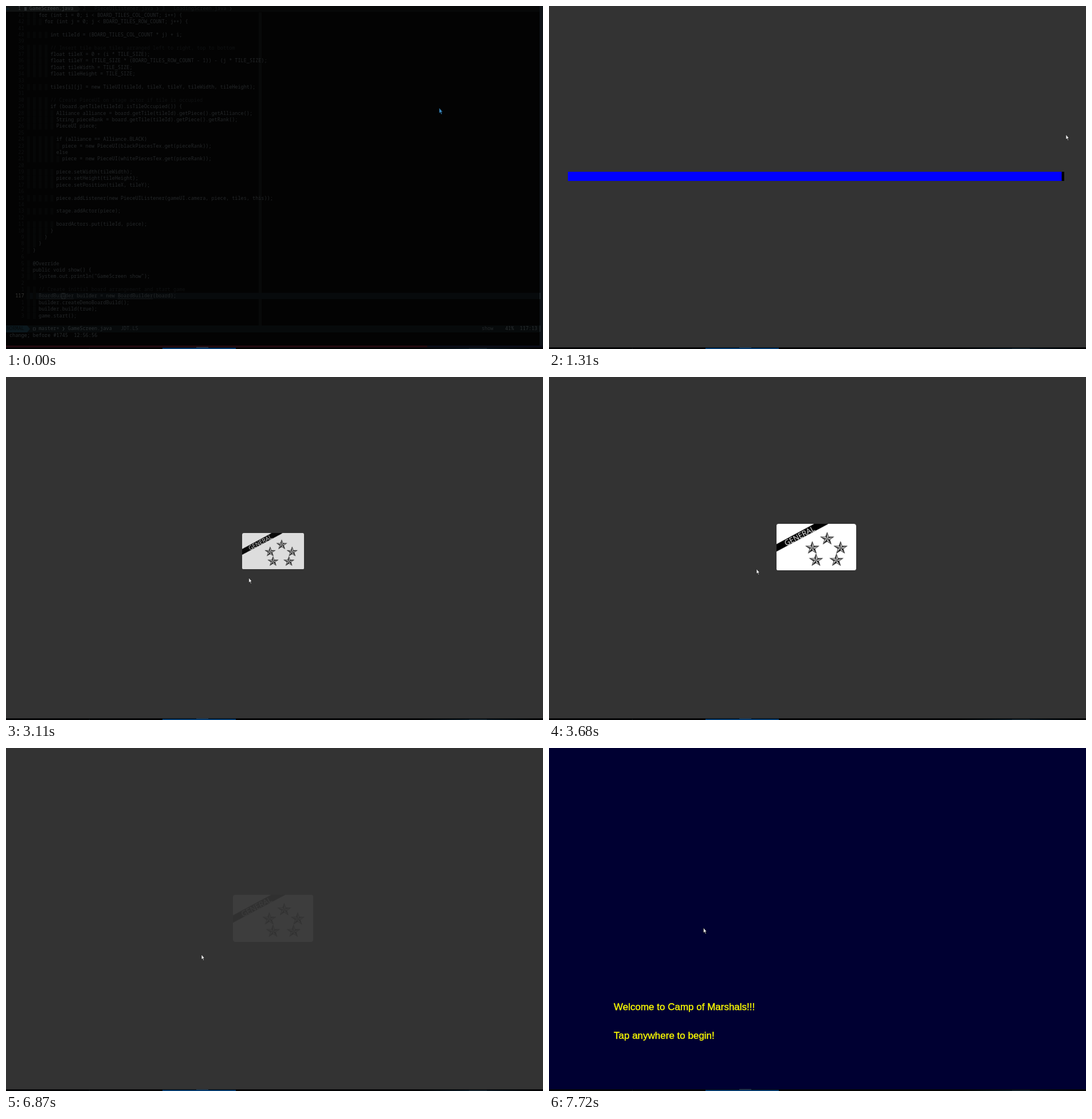
An HTML page with a canvas that plays this animation: 937x598 px, repeating every 8 s.

```html
<!DOCTYPE html>
<html lang="en">
<head>
<meta charset="utf-8">
<title>Splash</title>
<style>
html, body { margin: 0; width: 937px; height: 598px; overflow: hidden; background: #000; }
canvas { display: block; }
</style>
</head>
<body>
<canvas id="stage" width="937" height="598"></canvas>
<script>
const W = 937, H = 598, LOOP = 8000;
const ctx = document.getElementById('stage').getContext('2d');
ctx.imageSmoothingQuality = 'high';
const MONO = '"Noto Sans Mono", "DejaVu Sans Mono", monospace';

const code = `    for (int i = 0; i < BOARD_TILES_COL_COUNT; i++) {
      for (int j = 0; j < BOARD_TILES_ROW_COUNT; j++) {

        int tileId = (BOARD_TILES_COL_COUNT * j) + i;

        // Insert tile base tiles arranged left to right, top to bottom
        float tileX = 0 + (i * TILE_SIZE);
        float tileY = (TILE_SIZE * (BOARD_TILES_ROW_COUNT - 1)) - (j * TILE_SIZE);
        float tileWidth = TILE_SIZE;
        float tileHeight = TILE_SIZE;

        tiles[i][j] = new TileUI(tileId, tileX, tileY, tileWidth, tileHeight);

        // Create PieceUI on stage actor if tile is occupied
        if (board.getTile(tileId).isTileOccupied()) {
          Alliance alliance = board.getTile(tileId).getPiece().getAlliance();
          String pieceRank = board.getTile(tileId).getPiece().getRank();
          PieceUI piece;

          if (alliance == Alliance.BLACK)
            piece = new PieceUI(blackPiecesTex.get(pieceRank));
          else
            piece = new PieceUI(whitePiecesTex.get(pieceRank));

          piece.setWidth(tileWidth);
          piece.setHeight(tileHeight);
          piece.setPosition(tileX, tileY);

          piece.addListener(new PieceUIListener(gameUI.camera, piece, tiles, this));

          stage.addActor(piece);

          boardActors.put(tileId, piece);
        }
      }
    }
  }

  @Override
  public void show() {
    System.out.println("GameScreen show");

    // Create initial board arrangement and start game
    BoardBuilder builder = new BoardBuilder(board);
    builder.createDemoBoardBuild();
    builder.build(true);
    game.start();`.split('\n');

function rect(color, x, y, w, h, c = ctx) {
  c.fillStyle = color;
  c.fillRect(x, y, w, h);
}

function poly(color, pts, c = ctx) {
  c.beginPath();
  pts.forEach(p => c.lineTo(p[0], p[1]));
  c.closePath();
  c.fillStyle = color;
  c.fill();
}

function label(str, x, y, color) {
  ctx.fillStyle = color;
  ctx.fillText(str, x, y);
}

function drawEditor() {
  const left = 36.6, cw = 5.12, top = 16.3, lh = 11.39, current = 43;
  rect('#030303', 0, 0, W, H);
  rect('#080909', 441, 11, 5, 546);
  rect('#070a0c', 36, 500, 895, 11);

  // tab line
  rect('#070808', 0, 0, W, 10);
  poly('#101212', [[0, 0], [125, 0], [130, 5], [125, 10], [0, 10]]);
  rect('#0b1a20', 0, 3, 6, 4);
  ctx.font = '8.53px ' + MONO;
  ctx.textBaseline = 'middle';
  ctx.textAlign = 'left';
  label('1', 21, 5, '#3a3d3f');
  rect('#2c3032', 32, 2, 4, 6);
  label('GameScreen.java', 41, 5, '#3f4244');
  label('2   PieceUIListener.java ❯ 3   LoadingScreen.java ❯', 134, 5, '#171a1c');

  code.forEach((line, i) => {
    const y = top + i * lh, indent = line.search(/\S/);
    for (let k = 0; k < indent; k += 2) rect('#060707', left + k * cw, y - 5.7, cw, lh);
    const dim = line.trim().startsWith('//');
    label(line, left, y, dim ? '#101213' : '#25282a');
    ctx.textAlign = 'right';
    label(i === current ? '117' : Math.abs(current - i), 31.5, y, i === current ? '#3c3c39' : '#101213');
    ctx.textAlign = 'left';
  });
  rect('#1e2123', 57, 510, 61, .7);
  rect('#1e2123', 195, 510, 61, .7);
  ctx.strokeStyle = '#2a2e30';
  ctx.lineWidth = .8;
  ctx.strokeRect(97.5, 501, 5.5, 9.5);

  // status line
  rect('#070a0b', 0, 557, W, 12);
  poly('#0b181e', [[0, 557], [37, 557], [42, 563], [37, 569], [0, 569]]);
  label('NORMAL', 1, 563, '#06090a');
  ctx.strokeStyle = '#2b3032';
  ctx.strokeRect(47.5, 561, 4, 4);
  label('master+ ❯ GameScreen.java', 57, 563, '#2c3133');
  label('JDT.LS', 200, 563, '#24282a');
  label('show', 830, 563, '#24282a');
  label('41%  117:13', 871, 563, '#2c3133');
  label('change; before #1745  12:56:56', 6, 574.5, '#282c2e');

  rect('#0e1317', 931, 0, 6, 592);
  rect('#242c30', 931, 500, 1.5, 11);
  rect('#242c30', 931, 557, 1.5, 11);
  rect('#230a0f', 0, 592, 735, 3);
  rect('#0b0d18', 735, 592, 202, 3);
}

function drawTaskbar() {
  rect('#040506', 0, 595, W, 3);
  rect('#0d1418', 145, 596, 1, 2);
  rect('#063c70', 273, 596, 128, 2);
  rect('#26333c', 332, 594.5, 21, 1.5);
  const g = ctx.createLinearGradient(720, 0, 920, 0);
  g.addColorStop(0, '#040506');
  g.addColorStop(.5, '#0b1c28');
  g.addColorStop(1, '#040506');
  rect(g, 720, 596, 200, 2);
  rect('#16242e', 808, 596, 31, 2);
}

// faceted five-point star
function star(c, x, y) {
  const pt = i => {
    const a = -Math.PI / 2 + i * Math.PI / 5, r = i % 2 ? 4.6 : 11.6;
    return [x + r * Math.cos(a), y + .93 * r * Math.sin(a)];
  };
  const ring = Array.from({ length: 10 }, (_, i) => pt(i));
  poly('#d8d8d8', ring, c);
  for (let i = 0; i < 10; i += 2) poly(i === 4 || i === 6 ? '#111' : '#333', [[x, y], ring[i], ring[(i + 9) % 10]], c);
  c.beginPath();
  ring.forEach(p => c.lineTo(p[0], p[1]));
  c.closePath();
  c.strokeStyle = '#1c1c1c';
  c.lineWidth = .9;
  c.stroke();
}

const CARD = { x: 466.2, y: 296.8, w: 139.6, h: 81.4 };
const card = makeCard();

function makeCard() {
  const k = 2, cv = document.createElement('canvas'), c = cv.getContext('2d');
  cv.width = Math.round(CARD.w * k);
  cv.height = Math.round(CARD.h * k);
  c.scale(cv.width / CARD.w, cv.height / CARD.h);
  c.beginPath();
  c.roundRect(0, 0, CARD.w, CARD.h, 3.5);
  c.clip();
  rect('#fff', 0, 0, CARD.w, CARD.h, c);
  poly('#000', [[0, 35.5], [66, 0], [91, 0], [0, 48.5]], c);
  c.save();
  c.translate(40.6, 20.8);
  c.rotate(-.492);
  c.font = '13.3px "Open Sans", "Noto Sans", sans-serif';
  c.textAlign = 'center';
  c.fillStyle = '#fff';
  c.fillText('GENERAL', 0, 4.8);
  c.restore();
  [[89, 26], [63, 42], [112.5, 42], [69.5, 63.5], [105.3, 63.5]].forEach(p => star(c, p[0], p[1]));
  return cv;
}

const clamp = v => Math.min(1, Math.max(0, v));
const pow = (a, n) => a <= .5 ? (2 * a) ** n / 2 : 1 - (2 - 2 * a) ** n / 2;
function swing(a) {
  const s = 3;
  if (a <= .5) { a *= 2; return a * a * ((s + 1) * a - s) / 2; }
  a = (a - 1) * 2;
  return a * a * ((s + 1) * a + s) / 2 + 1;
}

const SPLASH = 1690, FADE = 5685;

function drawCard(t) {
  const d = t - SPLASH;
  const scale = .05 + .95 * pow(clamp(d / 2500), 5);
  const w = CARD.w * scale, h = CARD.h * scale;
  const y = 234.8 + (CARD.y - 234.8) * swing(clamp(d / 2000));
  ctx.globalAlpha = pow(clamp(d / 2000), 2) * (1 - clamp((t - FADE) / 1250));
  ctx.drawImage(card, CARD.x - w / 2, y - h / 2, w, h);
  ctx.globalAlpha = 1;
}

function drawBar(t) {
  rect('#000', 33, 289, 866, 16);
  const part = 1 - .657 * Math.exp(-(t - 390) / 190);
  rect('#00f', 33, 289, 866 * part, 16);
}

// time, x, y
const path = [
  [0, 756, 178], [70, 756, 178], [150, 741, 182], [390, 741, 182], [1140, 930, 217],
  [1700, 838, 240], [2100, 838, 240], [2480, 541.5, 377], [2960, 440, 354],
  [3680, 362, 334.5], [3830, 359, 333], [4610, 271, 330], [4770, 271, 330],
  [5320, 341, 322], [5860, 341, 322], [6240, 336, 352], [6390, 337, 359],
  [6640, 337, 359], [6870, 341, 360], [7270, 341, 360], [7720, 269.5, 313.5], [8000, 269.5, 313.5]
];

function pointer(t) {
  const i = path.findIndex(p => p[0] > t), a = path[i - 1], b = path[i];
  const f = (t - a[0]) / (b[0] - a[0]);
  return [a[1] + (b[1] - a[1]) * f, a[2] + (b[2] - a[2]) * f];
}

function drawPointer(t) {
  const [x, y] = pointer(t);
  const shape = [[0, 0], [0, 8.8], [1.9, 7.1], [3.4, 10.6], [4.7, 10], [3.3, 6.7], [5.6, 6.5]];
  poly(t < 70 ? '#3f8fc8' : '#eee', shape.map(p => [x + p[0], y + p[1]]));
  ctx.strokeStyle = t < 70 ? '#0e2a3c' : '#151515';
  ctx.lineWidth = .7;
  ctx.stroke();
}

function drawWelcome() {
  rect('#000032', 0, 0, W, 595);
  ctx.font = '17px "Liberation Sans", Arial, sans-serif';
  ctx.textBaseline = 'alphabetic';
  ctx.textAlign = 'left';
  ctx.strokeStyle = '#ff0';
  ctx.lineWidth = .35;
  [['Welcome to Camp of Marshals!!!', 457], ['Tap anywhere to begin!', 507]].forEach(([str, y]) => {
    label(str, 113, y, '#ff0');
    ctx.strokeText(str, 113, y);
  });
}

function draw(t) {
  if (t < 150) {
    drawEditor();
    if (t >= 70) rect('rgba(0,0,0,.6)', 0, 0, W, H);
  } else if (t < 390) {
    rect('#000', 0, 0, W, H);
  } else if (t < 7020) {
    rect('#333', 0, 0, W, 595);
    if (t < SPLASH) drawBar(t);
    else drawCard(t);
  } else {
    drawWelcome();
  }
  drawTaskbar();
  drawPointer(t);
}

function tick() {
  draw(performance.now() % LOOP);
  requestAnimationFrame(tick);
}
tick();
</script>
</body>
</html>
```
